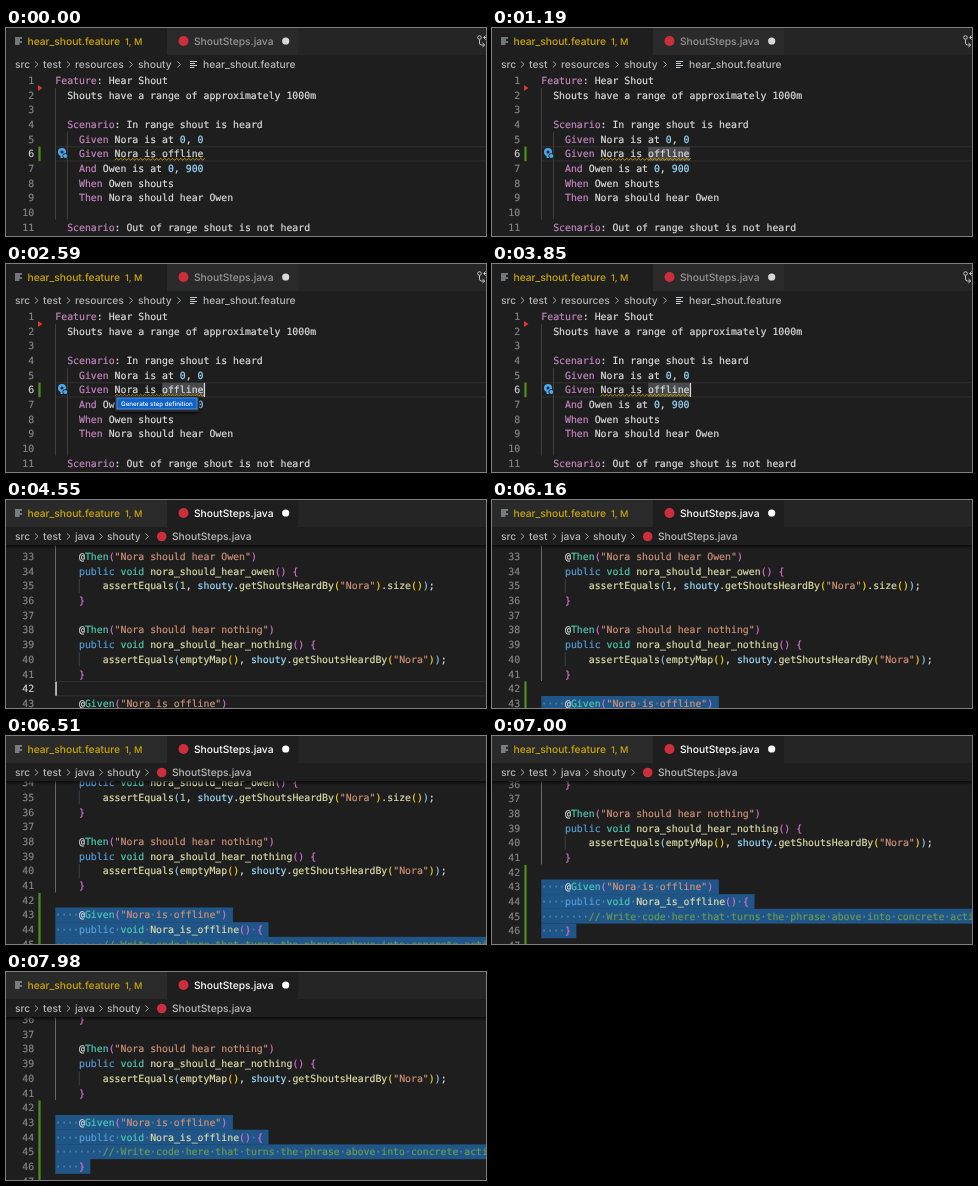
An HTML page that plays this animation: 480x208 px, repeating every 8 s.

```html
<!DOCTYPE html>
<html lang="en">
<head>
<meta charset="utf-8">
<title>Step definition generation</title>
<style>
  html, body { margin: 0; width: 100%; height: 100%; overflow: hidden; background: #1e1e1e; }
  svg { display: block; }
  text { white-space: pre; text-rendering: geometricPrecision; fill: currentColor; }
  .ui { font: 500 10.25px Inter, "Open Sans", sans-serif; }
  .code { font: 9.85px "DejaVu Sans Mono", monospace; color: #dcdcdc; }
  .code, tspan { fill: currentColor; stroke: currentColor; stroke-width: .18px; }
</style>
</head>
<body>
<svg id="stage" width="480" height="208" viewBox="0 0 480 208"></svg>
<script>
const CHAR = 5.94, ROW = 14.69, LEFT = 49.3, BASE = 3.5, LOOP = 8000;
const GOLD = '#cca700', RED = '#cc2f3b', GREEN = '#4f8f1f', NUMBER = '#858585', BRIGHT = '#d0d0d0';

const feature = `Feature: Hear Shout
  Shouts have a range of approximately 1000m

  Scenario: In range shout is heard
    Given Nora is at 0, 0
    Given Nora is offline
    And Owen is at 0, 900
    When Owen shouts
    Then Nora should hear Owen

  Scenario: Out of range shout is not heard`.split('\n');

const java = `    @Then("Nora should hear Owen")
    public void nora_should_hear_owen() {
        assertEquals(1, shouty.getShoutsHeardBy("Nora").size());
    }

    @Then("Nora should hear nothing")
    public void nora_should_hear_nothing() {
        assertEquals(emptyMap(), shouty.getShoutsHeardBy("Nora"));
    }

    @Given("Nora is offline")
    public void Nora_is_offline() {
        // Write code here that turns the phrase above into concrete actions
    }
`.split('\n');

// ---- drawing helpers: each returns SVG markup ----
const rect = (x, y, w, h, fill, more = '') =>
  `<rect x="${x}" y="${y}" width="${w}" height="${h}" fill="${fill}" ${more}/>`;
const path = (d, stroke, width = 1, fill = 'none') =>
  `<path d="${d}" stroke="${stroke}" stroke-width="${width}" fill="${fill}"/>`;
const dot = (x, y, r, fill) => `<circle cx="${x}" cy="${y}" r="${r}" fill="${fill}"/>`;
const label = (x, y, s, color, more = '') =>
  `<text class="ui" x="${x}" y="${y}" style="color:${color};${more}">${s}</text>`;
const code = (x, y, s, more = '') => `<text class="code" x="${x}" y="${y}" ${more}>${s}</text>`;
const span = (s, color) => `<tspan style="color:${color}">${s}</tspan>`;
const group = (id, body) => `<g id="${id}">${body}</g>`;
const linesIcon = (x, y) =>
  path(`M${x} ${y - 3}h7M${x} ${y - 1}h5M${x} ${y + 1}h7M${x} ${y + 3}h4.500`, '#c4cdd2');

// ---- syntax colours ----
const paintFeature = s => s.replace(/\b(Feature|Scenario|Given|And|When|Then)\b|\b\d+\b/g,
  (m, key) => span(m, key ? '#c586c0' : '#9cdcfe'));

let depth = 1;
const brackets = ['#ffd700', '#da70d6', '#87cefa'];
const words = { public: '#569cd6', void: '#4ec9b0', 1: '#b5cea8' };
function paintJava(s) {
  return s.replace(/\/\/.*|"[^"]*"|\w+\(?|[(){}]/g, m => {
    if (m.startsWith('//')) return span(m, '#6a9955');
    if (m[0] === '"') return span(m, '#ce9178');
    if (/[({]$/.test(m)) {
      const name = m.slice(0, -1);
      const hue = /^(Then|Given)$/.test(name) ? '#4ec9b0' : '#dcdcaa';
      return span(name, hue) + span(m.slice(-1), brackets[depth++ % 3]);
    }
    if (/[)}]/.test(m)) return span(m, brackets[--depth % 3]);
    return span(m, words[m] || '#9cdcfe');
  });
}

// ---- editor text ----
const fy = n => 52.4 + (n - 1) * ROW;
const jy = n => 56.5 + (n - 33) * ROW;

function listing(lines, first, mid, active, paint) {
  return lines.map((s, i) => {
    const n = first + i, y = mid(n) + BASE;
    return code(28.1, y, n,
      `id="n${n}" text-anchor="end" style="color:${n === active ? BRIGHT : NUMBER}"`) +
      code(LEFT, y, paint(s));
  }).join('');
}
const guide = (col, y1, y2, color = '#404040') =>
  path(`M${LEFT + .2 + col * CHAR} ${y1}V${y2}`, color);
const activeLine = mid => rect(LEFT, mid - 7.1, 440, 14.2, 'none', 'stroke="#303030"');
const changeBar = (mid, h) => rect(32.4, mid - 7.3, 2.2, h, GREEN);

function squiggle(x1, x2, y) {
  let d = `M${x1} ${y}`;
  for (let x = x1, up = 1; x < x2; x += 2, up = -up) d += `l2 ${-1.8 * up}`;
  return path(d, GOLD, .9);
}

// ---- tab strip and breadcrumbs ----
function header(onJava, crumbs, fileX, file) {
  const tab = on => on ? '#1e1e1e' : '#2a2a2a';
  let s = rect(0, 0, 480, 45, '#1e1e1e') + rect(0, 0, 480, 27, '#252526') +
    rect(0, 0, 161, 27, tab(!onJava)) + rect(161, 0, 131, 27, tab(onJava)) +
    linesIcon(9, 13) + label(21.5, 16.5, 'hear_shout.feature', GOLD) +
    label(119, 16.5, '1, M', GOLD, 'font-size:9.2px') +
    dot(177.5, 13, 5, RED) +
    label(188, 16.5, 'ShoutSteps.java', onJava ? '#ffffff' : '#969696') +
    dot(279.7, 13, 3.6, onJava ? '#ffffff' : '#d8d8d8');
  for (const [x, word, arrow] of crumbs)
    s += label(x, 40, word, '#b4b4b4') + path(`M${arrow - 1.6} 33.400l3.200 3l-3.200 3`, '#a0a0a0');
  s += onJava ? dot(fileX - 10.3, 36.5, 4.8, RED) : linesIcon(fileX - 13, 36.5);
  return s + label(fileX, 40, file, '#b8b8b8');
}

const compareIcon =
  path('M473.5 11.5V15q0 2 2 2h3M476.5 15l2.2 2l-2.2 2M482 15v-3.500q0-2-2-2h-2M479.500 7.500l-2 2l2 2', '#c5c5c5') +
  '<circle cx="473.5" cy="9.5" r="1.8" fill="none" stroke="#c5c5c5"/>';

const bulb = dot(56, 124, 4, '#4aa8f0') + rect(54.5, 127, 3, 3, '#4aa8f0') +
  dot(56, 124, 1.5, '#1e1e1e') + dot(59.3, 128, 2.8, '#1e1e1e') + dot(59.3, 128, 2.1, '#4aa8f0');

const popup = rect(109, 132, 84, 15.5, '#2b2e35', 'rx="1" filter="url(#shade)"') +
  rect(111, 134, 80, 11, '#0f62c8', 'stroke="#5aa0ee" stroke-width=".8"') +
  label(115, 141.8, 'Generate step definition', '#fff', 'font-size:6.25px');

const featurePane =
  activeLine(fy(6)) + guide(0, fy(2) - 7, fy(10) + 7) + guide(2, fy(5) - 7, fy(10) + 7) +
  group('word', rect(LEFT + 18 * CHAR, fy(6) - 7, 7 * CHAR, 14, '#484a4c')) +
  changeBar(fy(6), ROW) +
  path('M32 57l4.500 3l-4.500 3z', 'none', 0, '#e0382c') +
  listing(feature, 1, fy, 6, paintFeature) +
  squiggle(LEFT + 10 * CHAR, LEFT + 25 * CHAR, fy(6) + 6.3) + bulb +
  group('caret', rect(LEFT + 25 * CHAR, fy(6) - 7, 1.3, 14, '#d8d8d8')) +
  group('popup', popup) +
  header(false, [[9, 'src', 30.5], [37, 'test', 62.5], [69, 'resources', 125], [132, 'shouty', 173]],
    197, 'hear_shout.feature') + compareIcon;

const selection = [43, 44, 45, 46].map(n => {
  const s = java[n - 33];
  const dots = s.replace(/./g, c => c === ' ' ? '·' : ' ');
  return rect(LEFT, jy(n) - 7.4, (s.length + .9) * CHAR, ROW + .1, '#1f5587') +
    code(LEFT, jy(n) + BASE, dots, 'style="color:#5f87aa"');
}).join('');

const javaPane =
  group('scroller',
    group('fresh', activeLine(jy(42)) + rect(LEFT, jy(42) - 7, 1.5, 14, '#d8d8d8')) +
    guide(0, jy(32), jy(41) + 7, '#686868') +
    guide(4, jy(35) - 7, jy(35) + 7) + guide(4, jy(40) - 7, jy(40) + 7) +
    group('selection', selection) + group('added', changeBar(jy(42), 90)) +
    listing(java, 33, jy, 42, paintJava)) +
  rect(0, 45, 480, 4, 'url(#fade)') +
  header(true, [[9, 'src', 30.5], [37, 'test', 62.5], [69, 'java', 95], [101, 'shouty', 141]],
    166, 'ShoutSteps.java');

document.getElementById('stage').innerHTML = `<defs>
  <linearGradient id="fade" x2="0" y2="1">
    <stop stop-color="#000" stop-opacity=".6"/><stop offset="1" stop-color="#000" stop-opacity="0"/>
  </linearGradient>
  <filter id="shade" x="-10%" y="-50%" width="120%" height="200%">
    <feDropShadow dx="0" dy="1.5" stdDeviation="2" flood-opacity=".8"/>
  </filter>
</defs>` + rect(0, 0, 480, 208, '#1e1e1e') + group('feature', featurePane) + group('java', javaPane);

// ---- timeline ----
const $ = id => document.getElementById(id);
const show = (id, on) => $(id).setAttribute('display', on ? 'inline' : 'none');
const blinks = [[490, 1000], [1500, 2030], [2590, 3150], [3640, 4130]];

function draw(t) {
  const onJava = t >= 4550, selected = t >= 4620;
  show('feature', !onJava);
  show('java', onJava);
  show('word', t >= 350);
  show('caret', blinks.some(([on, off]) => t >= on && t < off));
  show('popup', t >= 2170 && t < 3290);
  show('fresh', !selected);
  show('selection', selected);
  show('added', t >= 5000);
  $('n42').style.color = selected ? NUMBER : BRIGHT;
  const p = Math.min(1, Math.max(0, (t - 6260) / 780));
  const scroll = 53 * (1 - (1 - p) ** 1.6);
  $('scroller').setAttribute('transform', `translate(0 ${-scroll})`);
}

function tick() {
  draw(performance.now() % LOOP);
  requestAnimationFrame(tick);
}
tick();
</script>
</body>
</html>
```
